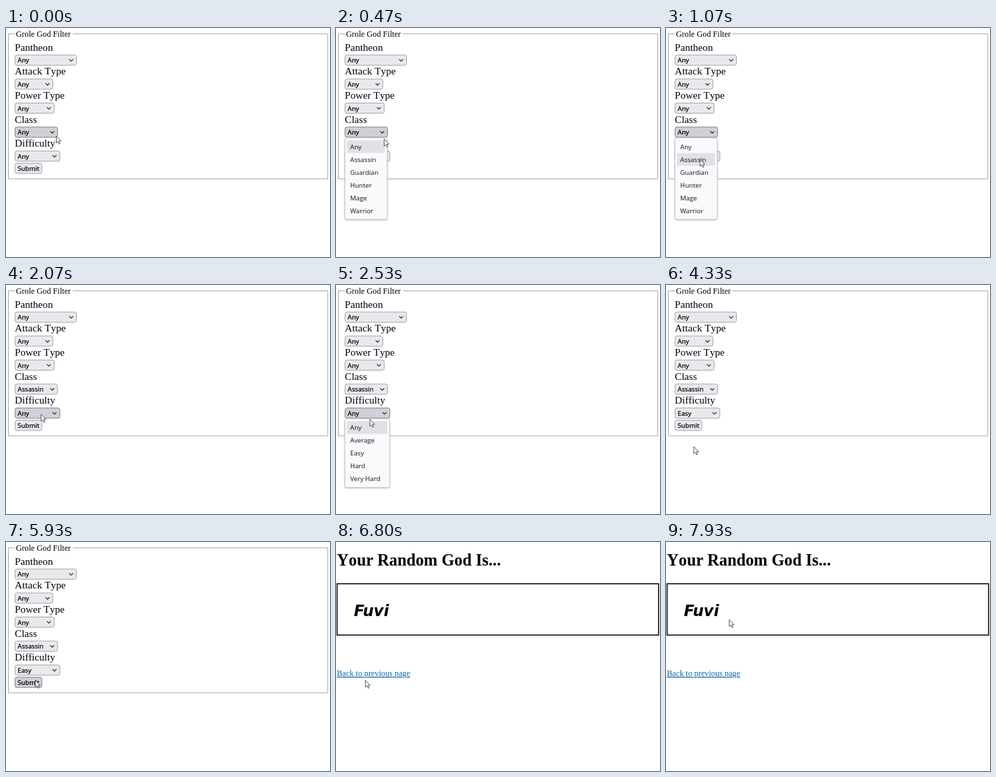
These frames come from a looping animation (480 px wide and 340 px high, 8 s). An HTML page:

```html
<!DOCTYPE html>
<html lang="en">
<head>
<meta charset="utf-8">
<title>God Filter</title>
<style>
  html, body { margin: 0; width: 100%; height: 100%; overflow: hidden; background: #fff; }
  svg { display: block; width: 100%; height: 100%; }
  text { white-space: pre; }
  .serif { font-family: "Liberation Serif", "Times New Roman", serif; font-kerning: none; }
  .ui { font: 9.7px "Open Sans", "Noto Sans", sans-serif; }
  .label { font-size: 15.2px; }
  .small { font-size: 12.2px; }
  .value { stroke: #000; stroke-width: .25; }
  .control { fill: #e9e9ed; stroke: #8f8f9d; stroke-width: .8; }
  .control.hot { fill: #d0d0d7; stroke: #676774; }
  .menu { fill: #fafafc; stroke: #c4c4ca; stroke-width: .8; filter: drop-shadow(0 1px 1.2px rgba(0, 0, 0, .28)); }
  .item { fill: #15141a; }
</style>
</head>
<body>
<svg id="stage" viewBox="0 0 480 340">
  <rect width="480" height="340" fill="#fff"/>
  <g id="form">
    <path d="M13 8.7H3.5V224H476.7V8.7H99" fill="none" stroke="#a6a6a6"/>
    <text class="serif small" x="14.7" y="13.2">Grole God Filter</text>
  </g>
  <g id="result">
    <text class="serif" x="1.2" y="35" font-size="24.3" font-weight="bold">Your Random God Is...</text>
    <rect x="1.6" y="62" width="476.3" height="76.2" fill="none" stroke="#000" stroke-width="1.5"/>
    <text x="26.4" y="110" style="font: italic bold 22.7px 'DejaVu Sans', Verdana, sans-serif">Fuvi</text>
    <text class="serif small" x="1.2" y="199" fill="#0563b5" text-decoration="underline">Back to previous page</text>
  </g>
  <path id="cursor" d="M0 0V10.3L2.3 8.2L4 11.9L5.6 11.2L4 7.6H7.2Z" fill="#fff" stroke="#333" stroke-width=".8" stroke-linejoin="round"/>
</svg>
<script>
const LOOP = 8000;
const SUBMITTED = 6800;
const $ = id => document.getElementById(id);
const form = $("form"), result = $("result"), cursor = $("cursor");

function add(parent, tag, attrs, text) {
  const el = document.createElementNS("http://www.w3.org/2000/svg", tag);
  for (const name in attrs) el.setAttribute(name, attrs[name]);
  if (text) el.textContent = text;
  parent.appendChild(el);
  return el;
}

function addControl(mid, right, text) {
  const box = add(form, "rect", { class: "control", x: 13.4, y: mid - 7.6, width: right - 13.8, height: 15.2, rx: 2.8 });
  const value = add(form, "text", { class: "ui value", x: 17.3, y: mid + 3.6 }, text);
  return { box, value };
}

function addSelect(label, row, right) {
  const mid = 47.7 + row * 35.63;
  add(form, "text", { class: "serif label", x: 13, y: mid - 14 }, label);
  const control = addControl(mid, right, "Any");
  add(form, "path", {
    d: `M${right - 11.2} ${mid - 1.3}l2.9 2.9l2.9 -2.9`,
    fill: "none", stroke: "#15141a", "stroke-width": 1.1
  });
  return control;
}

function addMenu(top, right, names) {
  const group = add(form, "g", {});
  const height = names.length * 19 + 7;
  add(group, "rect", { class: "menu", x: 13.2, y: top, width: right - 13.2, height, rx: 3 });
  const mark = add(group, "rect", { x: 16.3, width: right - 19.6, height: 18.8, fill: "#e0e0e6" });
  names.forEach((name, i) =>
    add(group, "text", { class: "ui item", x: 21, y: top + 16.8 + i * 19 }, name));
  return { group, mark, top, count: names.length };
}

addSelect("Pantheon", 0, 104.8);
addSelect("Attack Type", 1, 69.8);
addSelect("Power Type", 2, 71.8);
const classBox = addSelect("Class", 3, 76.8);
const levelBox = addSelect("Difficulty", 4, 80.2);
const submit = addControl(208.4, 53.5, "Submit");
const classMenu = addMenu(163, 75.8, ["Any", "Assassin", "Guardian", "Hunter", "Mage", "Warrior"]);
const levelMenu = addMenu(198.6, 79.4, ["Any", "Average", "Easy", "Hard", "Very Hard"]);

// Pointer stops: time, x, y
const path = [
  [0, 74.5, 160.3], [330, 74.5, 160.3], [950, 50.5, 195],
  [1500, 50.5, 195], [1850, 52, 192], [2400, 52, 192],
  [2950, 39.5, 243], [3700, 39.5, 243], [4100, 41.2, 240],
  [4650, 41.2, 240], [5350, 43.5, 205.3],
  [7199, 43.5, 205.3], [7200, 44.3, 200.8],
  [7590, 44.3, 200.8], [7920, 93.7, 115.2], [LOOP, 93.7, 115.2]
];

function pointerAt(t) {
  const i = path.findIndex(stop => stop[0] > t);
  const [t0, x0, y0] = path[i - 1], [t1, x1, y1] = path[i];
  const u = (t - t0) / (t1 - t0), k = u * u * (3 - 2 * u);
  return [x0 + (x1 - x0) * k, y0 + (y1 - y0) * k];
}

function show(el, on) {
  el.style.display = on ? "" : "none";
}

function updateMenu(menu, open, y) {
  show(menu.group, open);
  const row = Math.floor((y - menu.top - 3.7) / 19);
  const active = Math.max(0, Math.min(menu.count - 1, row));
  menu.mark.setAttribute("y", menu.top + 3.8 + active * 19);
}

function render(t) {
  const [x, y] = pointerAt(t);
  const classOpen = t >= 330 && t < 1400;
  const levelOpen = t >= 2330 && t < 3730;

  show(form, t < SUBMITTED);
  show(result, t >= SUBMITTED);
  updateMenu(classMenu, classOpen, y);
  updateMenu(levelMenu, levelOpen, y);

  classBox.box.classList.toggle("hot", t < 1400);
  levelBox.box.classList.toggle("hot", t >= 1400 && t < 3730);
  submit.box.classList.toggle("hot", t >= 4650 && y < 216);
  classBox.value.textContent = t < 1400 ? "Any" : "Assassin";
  levelBox.value.textContent = t < 3730 ? "Any" : "Easy";
  cursor.setAttribute("transform", `translate(${x} ${y})`);
}

const start = performance.now();
function tick() {
  render((performance.now() - start) % LOOP);
  requestAnimationFrame(tick);
}
tick();
</script>
</body>
</html>
```
